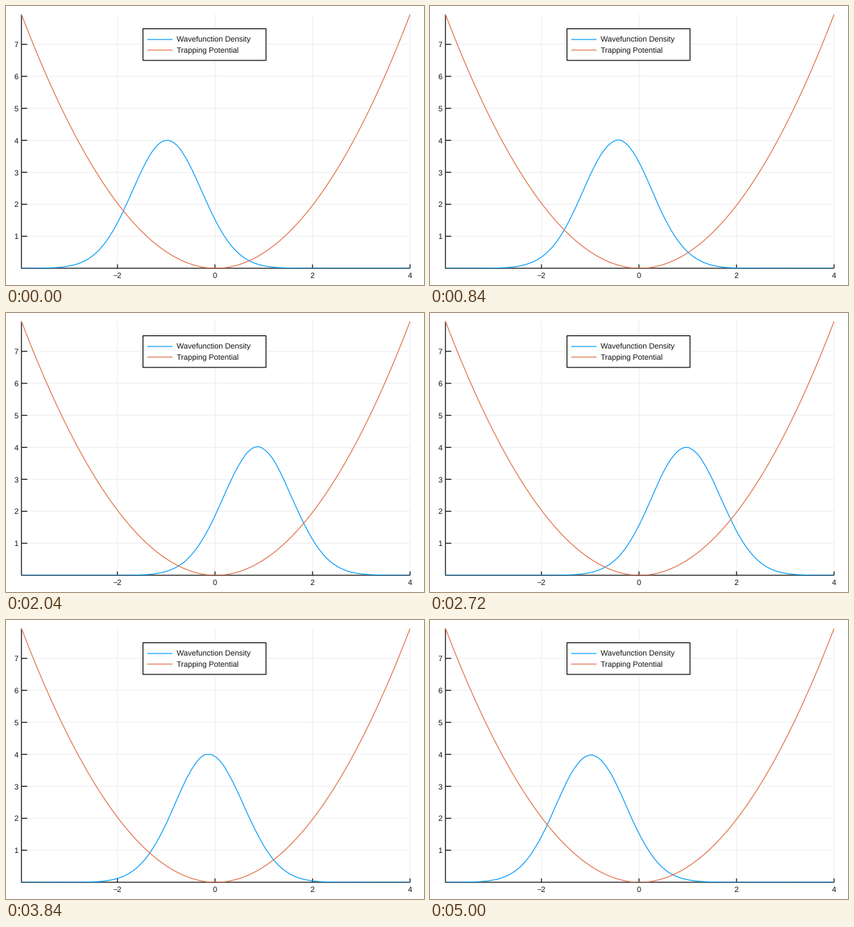
A matplotlib script that plays this animation: 600 by 400 pixels, repeating every 5.04 s.

```python
import numpy as np
import matplotlib.pyplot as plt
from matplotlib.animation import FuncAnimation
from matplotlib.patches import Rectangle

W, H, DPI = 600, 400, 100
FRAMES, INTERVAL = 126, 40
PX = 72 / DPI  # points per pixel

LEFT, RIGHT, TOP, BASE = 22.2, 580, 12, 376
X_ZERO, X_UNIT, Y_UNIT = 300, 70, 45.86
BLUE, ORANGE, GRID = "#009afa", "#e26f46", "#ececec"

plt.rcParams["font.family"] = "Liberation Sans"
plt.rcParams["path.simplify"] = False
plt.rcParams["text.hinting"] = "none"

# Harmonic oscillator solved by the split-operator method
X_MAX, N, DT = 4, 256, 0.05
DX = 2 * X_MAX / N
x = -X_MAX + DX * (np.arange(N) + 0.5)
k = 2 * np.pi * np.fft.fftfreq(N, DX)
potential = x**2 / 2
half_kick = np.exp(-0.5j * potential * DT)
drift = np.exp(-0.5j * k**2 * DT)


def evolve(steps):
    psi = np.exp(-((x + 1) ** 2) / 2).astype(complex)
    densities = []
    for _ in range(steps):
        psi = half_kick * np.fft.ifft(drift * np.fft.fft(half_kick * psi))
        densities.append(4 * np.abs(psi) ** 2)
    return densities


def to_px(v):
    return X_ZERO + X_UNIT * v


def to_py(v):
    return BASE - Y_UNIT * v


densities = evolve(FRAMES)
plot_x = to_px(x + DX / 2)  # curves are plotted half a cell to the right

fig = plt.figure(figsize=(W / DPI, H / DPI), dpi=DPI, facecolor="white")
ax = fig.add_axes([0, 0, 1, 1])
ax.set_xlim(0, W)
ax.set_ylim(H, 0)
ax.axis("off")


def line(xs, ys, color="black", width=1.2, z=2):
    return ax.plot(xs, ys, color=color, lw=width * PX, zorder=z, snap=False,
                   solid_capstyle="butt", solid_joinstyle="round")[0]


def label(px, py, text, align):
    ax.text(px, py, text, fontsize=11 * PX, ha=align, va="baseline",
            color="#111111", zorder=6)


# Grid, ticks and tick labels
for v in (-2, 0, 2, 4):
    px = to_px(v)
    line([px, px], [TOP, BASE], GRID, 1, 1)
    line([px, px], [BASE, BASE - 5.5])
    label(px, 389.7, str(v).replace("-", "\u2212"), "center")
for v in range(1, 8):
    py = to_py(v)
    line([LEFT, RIGHT], [py, py], GRID, 1, 1)
    line([LEFT, LEFT + 8.3], [py, py])
    label(17.6, py + 4, str(v), "right")

line([LEFT, LEFT], [TOP, BASE + 0.6])
line([LEFT, RIGHT], [BASE, BASE])

# Curves
density_line = line(plot_x, to_py(densities[0]), BLUE, 1.2, 3)
potential_line = line(plot_x, to_py(potential), ORANGE, 1.2, 4)
frame_box = Rectangle((LEFT, TOP), RIGHT - LEFT, BASE - TOP,
                      transform=ax.transData)
for curve in (density_line, potential_line):
    curve.set_clip_path(frame_box)

# Legend
ax.add_patch(Rectangle((196.6, 32.6), 176.6, 45.4, facecolor="white",
                       edgecolor="black", lw=1.2 * PX, zorder=5, snap=False))
for py, color, text in ((48, BLUE, "Wavefunction Density"),
                        (63.2, ORANGE, "Trapping Potential")):
    line([202.7, 239], [py, py], color, 1.2, 6)
    label(245, py + 4.1, text, "left")


def update(i):
    density_line.set_ydata(to_py(densities[i]))
    return (density_line,)


anim = FuncAnimation(fig, update, frames=FRAMES, interval=INTERVAL,
                     repeat=True, repeat_delay=0)
plt.show()
```
